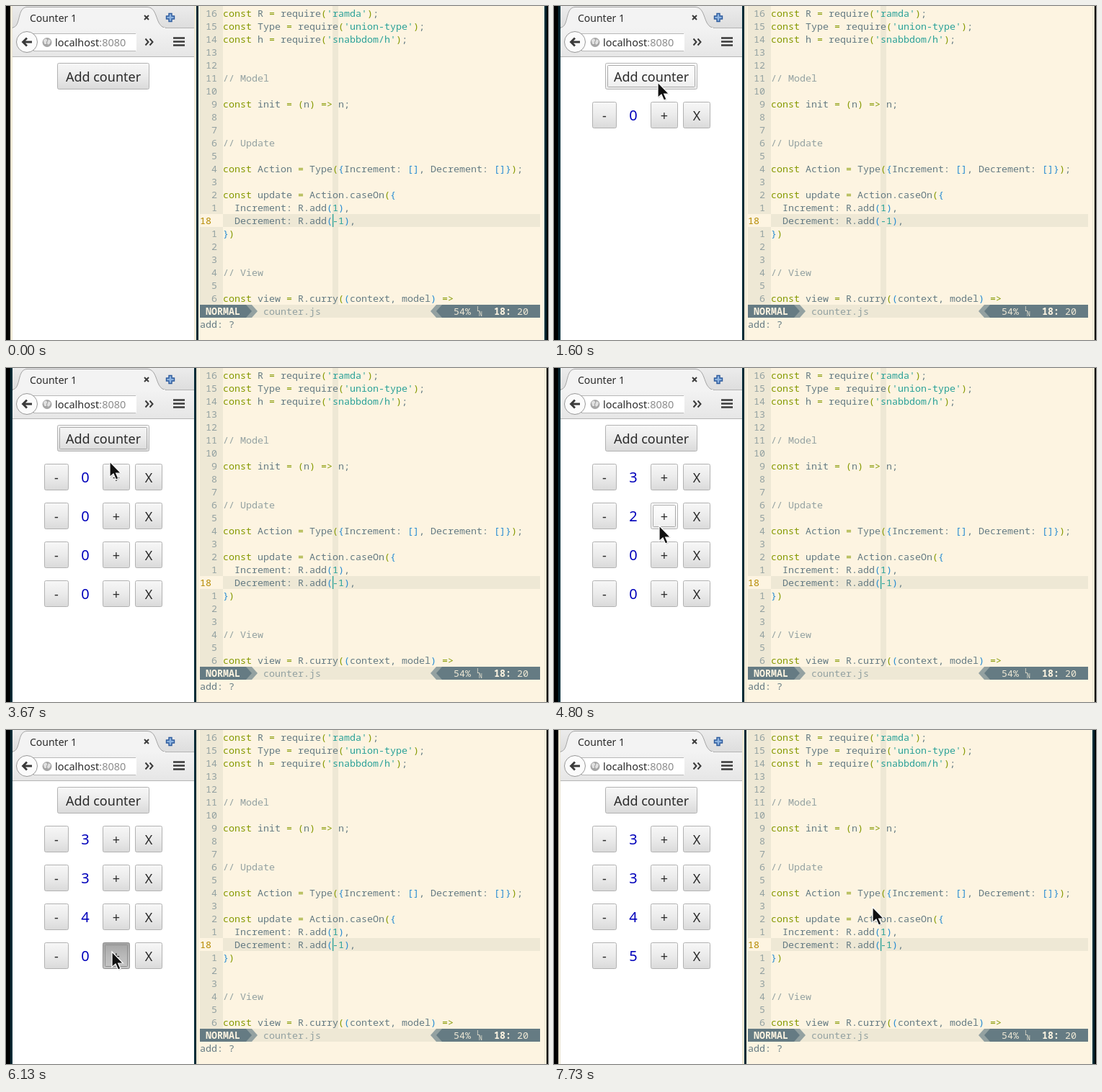
An HTML page for the animation above (8000 ms loop, 752 by 464 pixels).

```html
<!DOCTYPE html>
<html lang="en">
<head>
<meta charset="utf-8">
<title>Counter list</title>
<style>
html, body { margin: 0; width: 100%; height: 100%; overflow: hidden; background: #000; }
svg { display: block; width: 752px; height: 464px; }
text { white-space: pre; }
.mono { font: 13.333px "Noto Sans Mono", monospace; }
.bold { font-weight: 700; }
.ui { font-family: "Noto Sans", "Open Sans", sans-serif; fill: #2b2b2b; }
.mid { text-anchor: middle; }
.value { font-size: 20px; fill: #0000bb; }
.btn .face { fill: url(#normal); stroke: #b2b2b2; }
.btn .ring { fill: none; stroke: none; }
.btn.focus .ring { stroke: #a9a9a9; }
.btn.hover .face { fill: url(#hover); }
.btn.press .face { fill: url(#press); stroke: #8e8e8e; }
.btn.press .ring { stroke: #8f8f8f; }
</style>
</head>
<body>
<script>
const LOOP = 8000, CELL = 8, LINE = 18, CODE_X = 301, EDIT_X = 269;
const C = {
  paper: '#fdf4e1', shade: '#eee8d5', text: '#657b83', dim: '#93a1a1', green: '#859900',
  yellow: '#b58900', blue: '#268bd2', cyan: '#2aa198', active: '#002b36'
};

const rect = (x, y, w, h, fill, extra = '') =>
  `<rect x="${x}" y="${y}" width="${w}" height="${h}" fill="${fill}" ${extra}/>`;
const path = (d, fill, extra = '') => `<path d="${d}" fill="${fill}" ${extra}/>`;
const escapeText = s => s.replace(/&/g, '&amp;').replace(/</g, '&lt;').replace(/>/g, '&gt;');
const mono = (x, row, s, fill, cls = '') =>
  `<text class="mono ${cls}" x="${x}" y="${row * LINE + 15}" fill="${fill}">${escapeText(s)}</text>`;
const gradient = (id, ...stops) =>
  `<linearGradient id="${id}" x1="0" y1="0" x2="0" y2="1">${stops.map((c, i) =>
    `<stop offset="${i / (stops.length - 1)}" stop-color="${c}"/>`).join('')}</linearGradient>`;

const code = [
  "const R = require('ramda');", "const Type = require('union-type');",
  "const h = require('snabbdom/h');", '', '', '// Model', '', 'const init = (n) => n;', '', '',
  '// Update', '', 'const Action = Type({Increment: [], Decrement: []});', '',
  'const update = Action.caseOn({', '  Increment: R.add(1),', '  Decrement: R.add(-1),', '})',
  '', '', '// View', '', 'const view = R.curry((context, model) =>'
];
const CURSOR_ROW = 16;

function highlight(lines) {
  let depth = 0, out = '';
  const token = /\/\/.*|'[^']*'|const\b|=>?|-?\d+|[()[\]{}]|[^\s()[\]{}='\d-]+/g;
  lines.forEach((line, row) => {
    for (const { 0: s, index } of line.matchAll(token)) {
      let color = C.text;
      if (s.startsWith('//')) color = C.dim;
      else if (s[0] === "'" || /^-?\d/.test(s)) color = C.cyan;
      else if (/^(const|=>?)$/.test(s)) color = C.green;
      else if (/^[([{]$/.test(s)) color = depth++ ? C.blue : C.green;
      else if (/^[)\]}]$/.test(s)) color = --depth ? C.blue : C.green;
      out += mono(CODE_X + index * CELL, row, s, color);
    }
  });
  return out;
}

function lineNumbers() {
  return code.map((_, row) => {
    if (row === CURSOR_ROW) return mono(EDIT_X, row, '18', C.yellow);
    const n = String(Math.abs(row - CURSOR_ROW));
    return mono(EDIT_X + (3 - n.length) * CELL, row, n, C.dim);
  }).join('');
}

function statusLine() {
  const y = 415, m = y + 9, b = y + LINE;
  return rect(EDIT_X, y, 472, LINE, C.shade) +
    path(`M333 ${y}h8l8 9-8 9h-8z`, C.dim) + path(`M269 ${y}h64l8 9-8 9h-64z`, C.text) +
    path(`M605 ${y}h-8l-8 9 8 9h8z`, C.dim) + path(`M741 ${y}H605l-8 9 8 9h136z`, C.text) +
    mono(277, 23, 'NORMAL', C.paper, 'bold') + mono(357, 23, 'counter.js', C.dim) +
    mono(621, 23, '54%', C.shade) + mono(677, 23, '18:', C.paper, 'bold') + mono(709, 23, '20', C.shade) +
    `<g class="mono" fill="${C.shade}"><text x="653" y="${m}" style="font-size:8px">L</text>` +
    `<text x="656" y="${b - 2}" style="font-size:8px">N</text></g>`;
}

function editor() {
  const rowY = CURSOR_ROW * LINE + 1;
  return rect(264, 0, 486, 464, C.active, 'id="editorEdge"') + rect(267, 0, 480, 464, C.paper) +
    rect(EDIT_X, 0, 32, 415, C.shade) + rect(453, 0, CELL, 415, C.shade) +
    rect(EDIT_X, rowY, 32, LINE, C.paper) + rect(CODE_X, rowY, 440, LINE, C.shade) +
    lineNumbers() + highlight(code) + statusLine() + mono(EDIT_X, 24, 'add: ?', C.text) +
    rect(453, rowY, 1.3, LINE, C.cyan, 'id="caret"');
}

function chrome() {
  const line = w => `stroke="#3a3a3a" stroke-width="${w}"`;
  const tab = 'M9 30C21 29 15 2 29 1.5H196C212 2 206 29 222 30.5';
  return rect(6, 0, 258, 464, C.shade, 'id="browserEdge"') + rect(9, 0, 252, 464, '#fff') +
    rect(9, 0, 252, 31, 'url(#strip)') + rect(9, 30, 252, 40, 'url(#bar)') +
    path('M9 30.5H261', 'none', 'stroke="#b4b4b4"') +
    path(tab, '#f3f3f3', 'stroke="#a4a4a4"') + path('M10 30.5H221', 'none', 'stroke="#f3f3f3"') +
    path('M9 70.5H261', 'none', 'stroke="#b5b5b5"') +
    '<text class="ui" x="33" y="22" font-size="14">Counter 1</text>' +
    path('M192 13l6 6M198 13l-6 6', 'none', line(2)) +
    path('M226 10.5h4v3.5h3.500v4h-3.500v3.500h-4v-3.500h-3.500v-4h3.500z', '#8db3e0', 'stroke="#2c5a9c" stroke-width="1.4"') +
    rect(38.5, 38.5, 141, 24, '#fff', 'stroke="#b8b8b8"') + path('M180 39V62', 'none', 'stroke="#fff" stroke-width="2"') +
    '<circle cx="29" cy="50" r="14.5" fill="#fbfbfb" stroke="#989898"/>' +
    path('M36 50H24M29 44.500L23.500 50L29 55.500', 'none', line(2.8)) +
    '<circle cx="57" cy="50.500" r="6.500" fill="#a5a5a5"/>' +
    path('M52 48c2-3 4-3 5-1s-2 2-1 4-2 3-3 1zM59 46l3 2-1 4-3 2-1-3z', '#e2e2e2') +
    '<text class="ui" x="68" y="56" font-size="14.5">localhost<tspan fill="#8c8c8c">:8080</tspan></text>' +
    path('M193.500 45.500l4 4.500-4 4.500M199.500 45.500l4 4.500-4 4.500', 'none', line(2)) +
    path('M232 44.500h16M232 49.500h16M232 54.500h16', 'none', line(2.4));
}

const button = (x, y, w, label, id = '') =>
  `<g class="btn" id="${id}">` +
  `<rect class="face" x="${x + .5}" y="${y + .5}" width="${w - 1}" height="36" rx="2"/>` +
  `<rect class="ring" x="${x + 3.5}" y="${y + 3.5}" width="${w - 7}" height="30" rx="1"/>` +
  `<text class="ui mid" x="${x + w / 2}" y="${y + 26}" font-size="18">${label}</text></g>`;

const rowTop = i => 133 + 54 * (i - 1);
const counter = i => {
  const y = rowTop(i);
  return `<g id="row${i}">${button(53, y, 34, '-')}` +
    `<text class="ui mid value" id="value${i}" x="110" y="${y + 26}">0</text>` +
    `${button(134, y, 38, '+', 'target' + i)}${button(179, y, 38, 'X')}</g>`;
};

document.body.innerHTML = `<svg viewBox="0 0 752 464"><defs>
${gradient('normal', '#f7f7f7', '#ebebeb', '#dadada')}${gradient('hover', '#ffffff', '#f8f8f8', '#ececec')}
${gradient('press', '#a4a4a4', '#b9b9b9', '#c6c6c6')}${gradient('strip', '#ececec', '#dddddd')}
${gradient('bar', '#f3f3f3', '#e6e6e6')}</defs>
${rect(0, 0, 752, 464, '#000')}${chrome()}${editor()}
${button(71, 79, 128, 'Add counter', 'target0')}${[1, 2, 3, 4].map(counter).join('')}
<g id="pointer">${path('M1 2V22.500L6 18L9.500 26L13 24.500L9.700 17H16.500z', '#000', 'opacity=".18"')}
${path('M0 0V21.500L5 17L8.500 25L12 23.500L8.700 16H15.500z', '#111', 'stroke="#fff" stroke-width="1.2"')}</g></svg>`;

// press time, release time, target (0 adds a row, 1-4 increment it)
const clicks = [
  [1400, 1530, 0], [1930, 2070, 0], [2400, 2600, 0], [2930, 3070, 0],
  [3870, 3930, 1], [4000, 4070, 1], [4130, 4200, 1],
  [4530, 4670, 2], [4730, 4800, 2], [4930, 5000, 2],
  [5200, 5270, 3], [5330, 5400, 3], [5530, 5600, 3], [5730, 5800, 3],
  [6130, 6200, 4], [6270, 6330, 4], [6400, 6470, 4], [6530, 6670, 4], [6730, 6870, 4]
];
// time, x, y of the pointer tip
const route = [
  [200, 440, 262], [1000, 144, 106], [3600, 144, 106], [3670, 144, 130], [3800, 146, 158],
  [4270, 146, 158], [4470, 146, 219], [5000, 146, 219], [5200, 146, 265], [5800, 146, 265],
  [6070, 147, 308], [6870, 147, 308], [7670, 452, 247], [7730, 442, 246]
];
const blinks = [200, 1400, 2600], BLINK = 600;

const $ = id => document.getElementById(id);

function pointerAt(t) {
  const next = route.findIndex(p => p[0] > t);
  if (next < 0) return route[route.length - 1].slice(1);
  if (next === 0) return route[0].slice(1);
  const [t0, x0, y0] = route[next - 1], [t1, x1, y1] = route[next];
  const u = (t - t0) / (t1 - t0), e = u * u * (3 - 2 * u);
  return [x0 + (x1 - x0) * e, y0 + (y1 - y0) * e].map(Math.round);
}

function render(time) {
  const t = Math.round(Math.floor((time + 4) * .015) * 20 / 3) * 10;
  const [x, y] = pointerAt(t), shown = t >= 200, inBrowser = shown && x < 264;
  const started = clicks.filter(c => c[0] <= t), last = started[started.length - 1];
  const total = i => clicks.filter(c => c[2] === i && c[1] <= t).length;
  const rows = total(0);

  $('pointer').setAttribute('transform', `translate(${x} ${y})`);
  $('pointer').style.display = shown ? '' : 'none';
  $('caret').style.display = blinks.some(b => t >= b && t < b + BLINK) ? 'none' : '';
  $('browserEdge').setAttribute('fill', inBrowser ? C.active : C.shade);
  $('editorEdge').setAttribute('fill', inBrowser ? C.shade : C.active);

  for (let i = 0; i <= 4; i++) {
    const left = i ? 134 : 71, right = i ? 172 : 199, top = i ? rowTop(i) : 79;
    const focus = inBrowser && last && last[2] === i;
    const hover = inBrowser && x >= left && x < right && y >= top && y < top + 37;
    const press = focus && t < last[1];
    $('target' + i).setAttribute('class',
      'btn' + (focus ? ' focus' : '') + (hover ? ' hover' : '') + (press ? ' press' : ''));
    if (i) {
      $('row' + i).style.display = i <= rows ? '' : 'none';
      $('value' + i).textContent = total(i);
    }
  }
}

const start = performance.now();
function tick() {
  render((performance.now() - start) % LOOP);
  requestAnimationFrame(tick);
}
tick();
</script>
</body>
</html>
```
